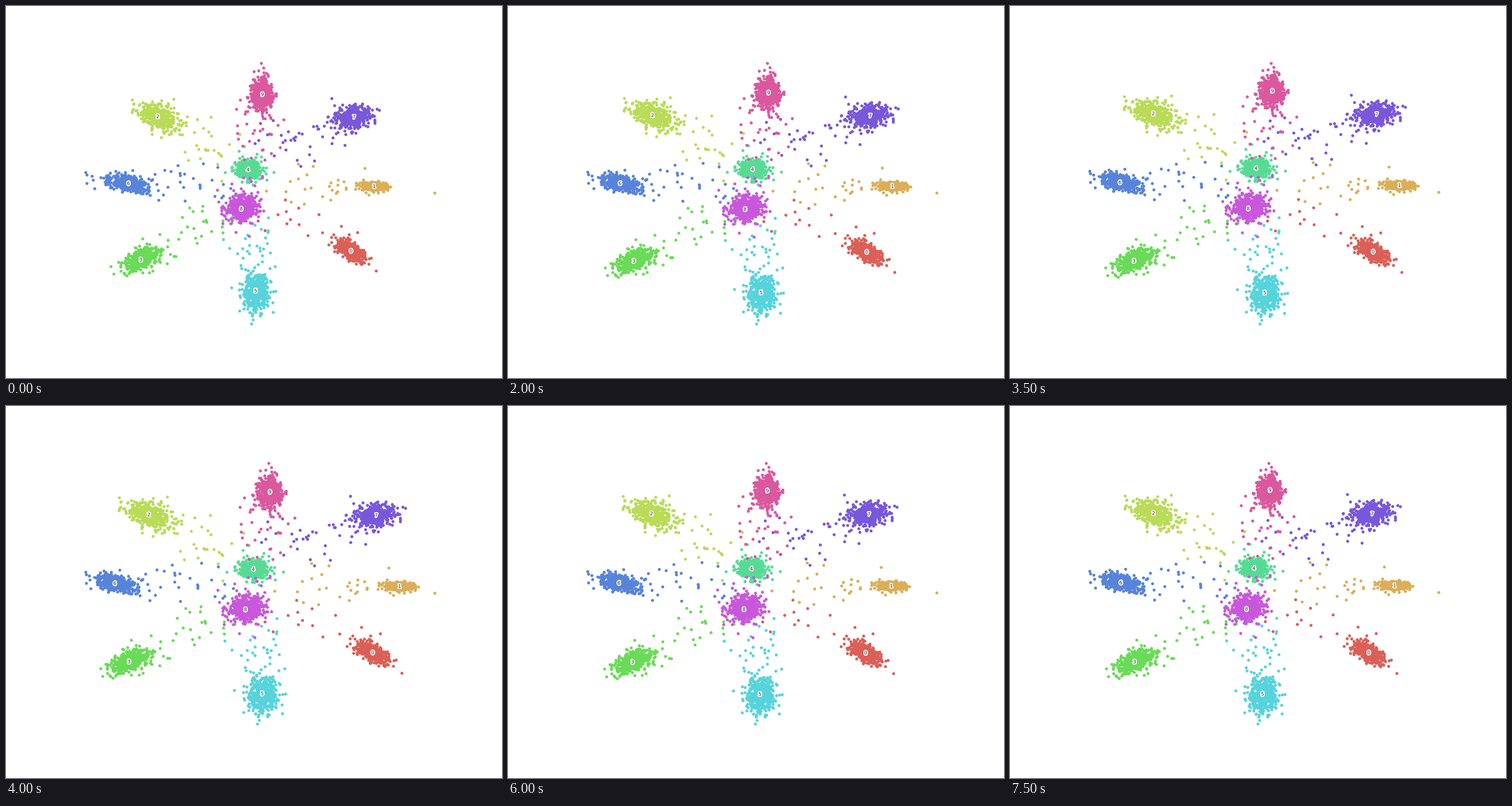
Write a matplotlib script that moves like this. It is 864 px wide and 648 px high and loops after 8 s.

```python
import colorsys

import matplotlib.pyplot as plt
import matplotlib.patheffects as pe
import numpy as np
from matplotlib.animation import FuncAnimation

W, H, DPI = 864, 648, 72
STEP, FRAMES = 500, 16
LEFT, RIGHT, TOP, BOTTOM = 139, 747, 100, 554
FOCUS = np.array([430, 300])
rng = np.random.default_rng(11)

# Settled layout: x, y, spread x, spread y, tilt, stray count
CLUSTERS = [
    (625, 430, 13.5, 9.5, .65, 26),
    (670, 313, 11, 3.8, 0, 26),
    (250, 187, 17.5, 11, .5, 38),
    (217, 446, 16, 10, -.5, 46),
    (425, 283, 11, 8, 0, 38),
    (440, 502, 12, 14, 0, 58),
    (193, 308, 16.5, 7, .4, 46),
    (631, 188, 17, 9, -.15, 56),
    (412, 354, 15, 11, 0, 60),
    (453, 147, 10, 14, 0, 60),
]
EXTREMES = {1: (RIGHT, 325), 5: (432, BOTTOM), 6: (LEFT, 288), 9: (451, TOP)}

# Drift and stretch of the whole map over time, in pixels
KEYS = [0, 1, 2, 3, 4, 6, 7.5]
DRIFT_X = [-4, -8.5, 1, 1, 6, -1, 0]
STRETCH_X = [-20.5, -10, -1, .5, 8, -1, 0]
DRIFT_Y = [1, .5, 1, -2, 1.2, .6, 0]
STRETCH_Y = [-6.5, -2.5, -3.5, -1.5, -2, -.3, 0]


def core(x, y, sx, sy, tilt, n=430):
    a, b = rng.standard_normal((2, n))
    return np.c_[x + sx * a, y + sy * (tilt * a + np.sqrt(1 - tilt ** 2) * b)]


def tail(x, y, n):
    """Strays thinning out from a cluster towards the middle of the map."""
    reach = (FOCUS - (x, y)) * (.85, .6)
    f = rng.random((n, 1)) ** 1.4
    return (x, y) + f * reach + rng.standard_normal((n, 2)) * (15 + 14 * f)


def cluster(k):
    x, y, sx, sy, tilt, strays = CLUSTERS[k]
    pts = np.vstack([core(x, y, sx, sy, tilt), tail(x, y, strays)])
    pts = np.clip(pts, (LEFT, TOP), (RIGHT, BOTTOM))
    return np.vstack([pts, EXTREMES[k]]) if k in EXTREMES else pts


def shift(v, low, high, drift, stretch, mid, half, t):
    """Linear motion along one axis, pinned at the outer edges."""
    pin = np.clip(np.minimum(v - low, high - v) / 45, 0, 1)
    move = np.interp(t, KEYS, drift) + np.interp(t, KEYS, stretch) * (v - mid) / half
    return v + pin * move


def warp(p, t):
    return np.c_[shift(p[:, 0], LEFT, RIGHT, DRIFT_X, STRETCH_X, 430, 200, t),
                 shift(p[:, 1], TOP, BOTTOM, DRIFT_Y, STRETCH_Y, 320, 180, t)]


groups = [cluster(k) for k in range(10)]
points = np.vstack(groups)
homes = np.array([c[:2] for c in CLUSTERS], float)
colors = np.repeat(
    [colorsys.hls_to_rgb(k / 10 + .01, .6, .65) for k in range(10)],
    [len(g) for g in groups], axis=0)

fig = plt.figure(figsize=(W / DPI, H / DPI), dpi=DPI, facecolor="white")
ax = fig.add_axes([0, 0, 1, 1])
ax.set_xlim(0, W)
ax.set_ylim(H, 0)
ax.axis("off")

dots = ax.scatter(*points.T, s=27, c=colors, linewidths=0)
outline = [pe.withStroke(linewidth=4, foreground="white")]
labels = [ax.text(*pos, str(k), fontsize=8.5, color="#262626", ha="center",
                  va="center", family="DejaVu Sans", path_effects=outline, zorder=5)
          for k, pos in enumerate(homes)]


def draw(i):
    t = i * STEP / 1000
    dots.set_offsets(warp(points, t))
    for label, pos in zip(labels, warp(homes, t)):
        label.set_position(pos)
    return [dots, *labels]


anim = FuncAnimation(fig, draw, frames=FRAMES, interval=STEP,
                     repeat=True, repeat_delay=0)
plt.show()
```
